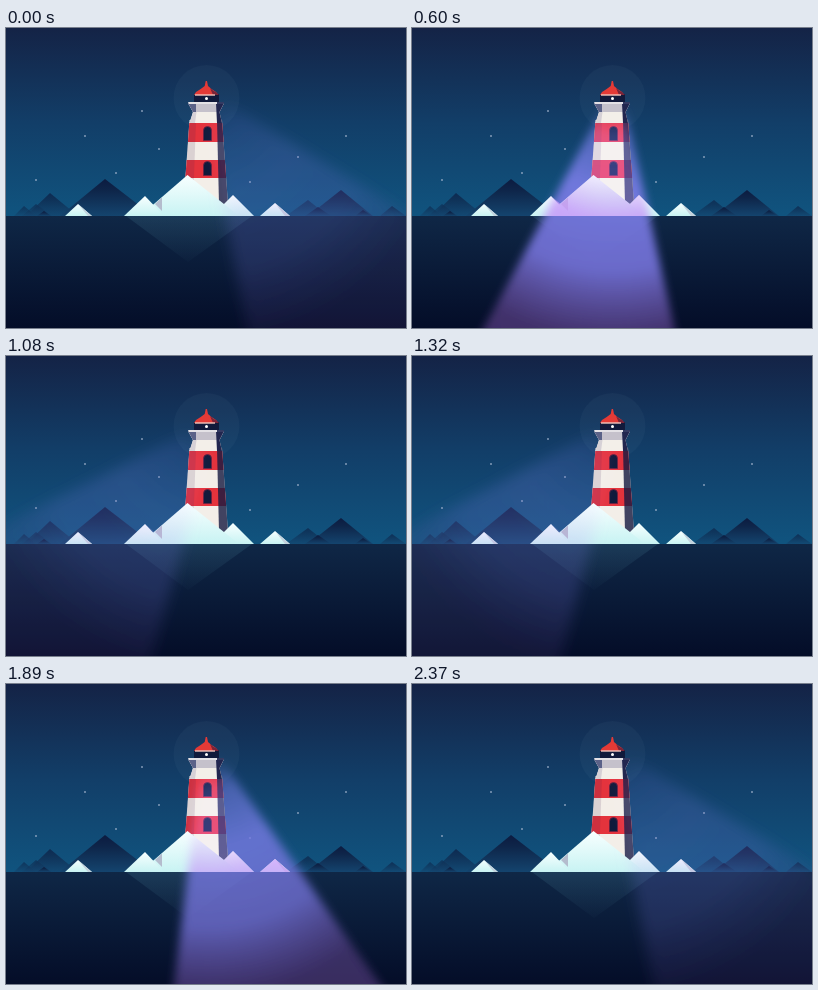
Write an HTML page that moves like this. It is 400 by 300 pixels and loops after 2.4 s.

```html
<!DOCTYPE html>
<html lang="en">
<head>
<meta charset="utf-8">
<title>Lighthouse</title>
<style>
  html, body { margin: 0; width: 100%; height: 100%; overflow: hidden; background: #0a1c3c; }
  svg { display: block; width: 400px; height: 300px; }
  .screen { mix-blend-mode: screen; }
</style>
</head>
<body>
<svg viewBox="0 0 400 300">
  <defs>
    <linearGradient id="sky" x2="0" y2="1">
      <stop stop-color="#142346"/>
      <stop offset=".5" stop-color="#123e68"/>
      <stop offset="1" stop-color="#10547f"/>
    </linearGradient>
    <linearGradient id="sea" x2="0" y2="1">
      <stop stop-color="#0f2746"/>
      <stop offset="1" stop-color="#040d28"/>
    </linearGradient>
    <linearGradient id="hill" x2="0" y2="1">
      <stop stop-color="#0c1b40"/>
      <stop offset=".3" stop-color="#0e2549"/>
      <stop offset="1" stop-color="#14446e"/>
    </linearGradient>
    <linearGradient id="ice" x2="0" y2="1">
      <stop stop-color="#f8ffff"/>
      <stop offset="1" stop-color="#c8f3f3"/>
    </linearGradient>
    <linearGradient id="mirror" x2="0" y2="1">
      <stop stop-color="#5fa3b8" stop-opacity=".16"/>
      <stop offset="1" stop-color="#5fa3b8" stop-opacity=".02"/>
    </linearGradient>
    <radialGradient id="light" gradientUnits="userSpaceOnUse" cx="202" cy="70" r="270">
      <stop offset=".04" stop-color="#6c78dc" stop-opacity="0"/>
      <stop offset=".14" stop-color="#6c78dc" stop-opacity=".68"/>
      <stop offset=".35" stop-color="#767ae2" stop-opacity=".96"/>
      <stop offset=".64" stop-color="#7472d8" stop-opacity=".92"/>
      <stop offset=".9" stop-color="#6a4896" stop-opacity=".6"/>
    </radialGradient>
    <radialGradient id="glaze" gradientUnits="userSpaceOnUse" cx="202" cy="70" r="110">
      <stop offset=".1" stop-color="#6068d0" stop-opacity="0"/>
      <stop offset=".35" stop-color="#6068d0" stop-opacity=".42"/>
      <stop offset="1" stop-color="#6858d0" stop-opacity=".5"/>
    </radialGradient>
    <radialGradient id="tint" gradientUnits="userSpaceOnUse" cx="202" cy="70" r="122">
      <stop offset=".62" stop-color="#d8acf8" stop-opacity=".15"/>
      <stop offset="1" stop-color="#c898fa" stop-opacity=".85"/>
    </radialGradient>
    <filter id="soft" filterUnits="userSpaceOnUse" x="-60" y="40" width="520" height="330">
      <feGaussianBlur id="blur" stdDeviation="4"/>
    </filter>
    <clipPath id="bergs">
      <path d="M118 188L139 168L152 179L181.500 147L233 188L206 188L227 167L248 188ZM134 188L181.500 147L233 188ZM59 188L72 176L86 188ZM254 188L269 175L284 188Z"/>
    </clipPath>
    <clipPath id="tower"><path d="M183.500 92H216L222 176H177.500Z"/></clipPath>
  </defs>

  <rect width="400" height="189" fill="url(#sky)"/>
  <circle cx="200.500" cy="70" r="33" fill="#8fa8bc" opacity=".05"/>
  <g id="stars" fill="#a9b9d0" opacity=".75"></g>
  <g id="hills"></g>
  <rect y="188" width="400" height="112" fill="url(#sea)"/>
  <path d="M120 188H246L182 234Z" fill="url(#mirror)"/>

  <g filter="url(#soft)"><path class="beam" fill="url(#light)"/></g>

  <g clip-path="url(#tower)">
    <rect x="170" y="90" width="60" height="90" fill="#f3eee8"/>
    <path d="M170 95H230V114H170ZM170 132H230V150H170Z" fill="#e4333c"/>
    <path d="M183 92H190L187 176H177Z" fill="#45204e" opacity=".14"/>
    <path d="M211 92H230V176H213Z" fill="#161a40" opacity=".8"/>
  </g>
  <g id="windows" fill="#101a3a" stroke="#6d2040" stroke-width=".8"></g>
  <g class="screen" clip-path="url(#tower)">
    <g filter="url(#soft)"><path class="beam" fill="url(#glaze)"/></g>
  </g>

  <path d="M182 75H218L213.500 84L216 95H183.500L187 84Z" fill="#f3efe9"/>
  <path d="M182 75H218L213.500 84H187Z" fill="#c5c1cb"/>
  <path d="M182 75H190V84H187Z" fill="#5b6288"/>
  <path d="M187 84H190.500L189 95H183.500Z" fill="#d6d1d6"/>
  <path d="M210 75H218L213.500 84L216 95H211Z" fill="#22264f"/>

  <path d="M206 188L227 167L248 188Z" fill="url(#ice)"/>
  <path d="M134 188L181.500 147L233 188Z" fill="url(#ice)"/>
  <path d="M118 188L139 168L158 188Z" fill="url(#ice)"/>
  <path d="M149 176L156 169.500V183Z" fill="#b4bccd"/>
  <path d="M59 188L72 176L86 188ZM254 188L269 175L284 188Z" fill="url(#ice)"/>
  <path d="M72 176L86 188H82ZM269 175L284 188H279Z" fill="#c3d3de"/>

  <g clip-path="url(#bergs)"><g filter="url(#soft)"><path class="beam" fill="url(#tint)"/></g></g>

  <path d="M182 74H211V76H183Z" fill="#e4e2e6"/>
  <path d="M211 74H218L217 76H211Z" fill="#343a62"/>
  <path d="M188 66H213V74H188Z" fill="#111a3b"/>
  <circle cx="200.500" cy="70.500" r="1.500" fill="#fff"/>
  <path d="M199.700 53H201L202 58Q205 61 210 64L212 67H188L190 64Q195 61 198.700 58Z" fill="#e43a36"/>
  <path d="M204 60Q207 63 210 64L213 67H207Z" fill="#7c2438"/>
  <path d="M189 67H209" stroke="#f3c4bc" stroke-width="1.400"/>
</svg>
<script>
  const $ = id => document.getElementById(id);
  const pairs = (s, f) => s.map(f).join('');

  $('stars').innerHTML = pairs(
    [[136, 83], [79, 108], [110, 145], [30, 152], [153, 121], [340, 108], [292, 129], [244, 154]],
    ([x, y]) => `<circle cx="${x}" cy="${y}" r="1"/>`);

  // peak x, peak y, base left, base right, opacity
  $('hills').innerHTML = pairs([
    [18, 178, 8, 30, .5], [30, 176, 16, 46, .5], [386, 178, 374, 400, .6],
    [302, 172, 280, 322, .6], [44, 165, 20, 72, .7], [99, 151, 54, 147, 1],
    [335, 162, 302, 367, 1], [38, 183, 31, 45, 1], [312, 179, 299, 325, 1], [357, 182, 349, 366, 1]
  ], ([x, y, l, r, o]) =>
    `<path d="M${l} 188L${x} ${y}L${r} 188Z" fill="url(#hill)" opacity="${o}"/>`);

  $('windows').innerHTML = pairs([98.5, 133.5], y =>
    `<path d="M197.500 ${y + 14}V${y + 4}a4 4 0 0 1 8 0V${y + 14}Z"/>`);

  const HALF = 1200, LEAD = 35, REACH = 480;
  const beams = document.querySelectorAll('.beam');

  const easeIn = u => (2 * u) ** 2.5 / 2;
  const ease = u => u < .5 ? easeIn(u) : 1 - easeIn(1 - u);

  function draw(now) {
    const p = (now + LEAD) / HALF % 2;
    const u = p < 1 ? p : 2 - p;
    const side = 1 - 2 * ease(u);
    const swing = 37.5 * side - 2.5;
    const spread = 20.4 + 3.5 * side * side;
    const glow = .22 + .78 * Math.sin(Math.PI * u) ** 4;
    const end = (x, deg) => {
      const a = deg * Math.PI / 180;
      return `${x + REACH * Math.sin(a)} ${70 + REACH * Math.cos(a)}`;
    };
    const d = `M196 70L${end(196, swing - spread)}L${end(211, swing + spread)}L211 70Z`;
    for (const b of beams) {
      b.setAttribute('d', d);
      b.setAttribute('opacity', glow);
    }
    $('blur').setAttribute('stdDeviation', 4 + 3 * side * side);
  }

  const start = performance.now();
  function tick() {
    draw(performance.now() - start);
    requestAnimationFrame(tick);
  }
  tick();
</script>
</body>
</html>
```
